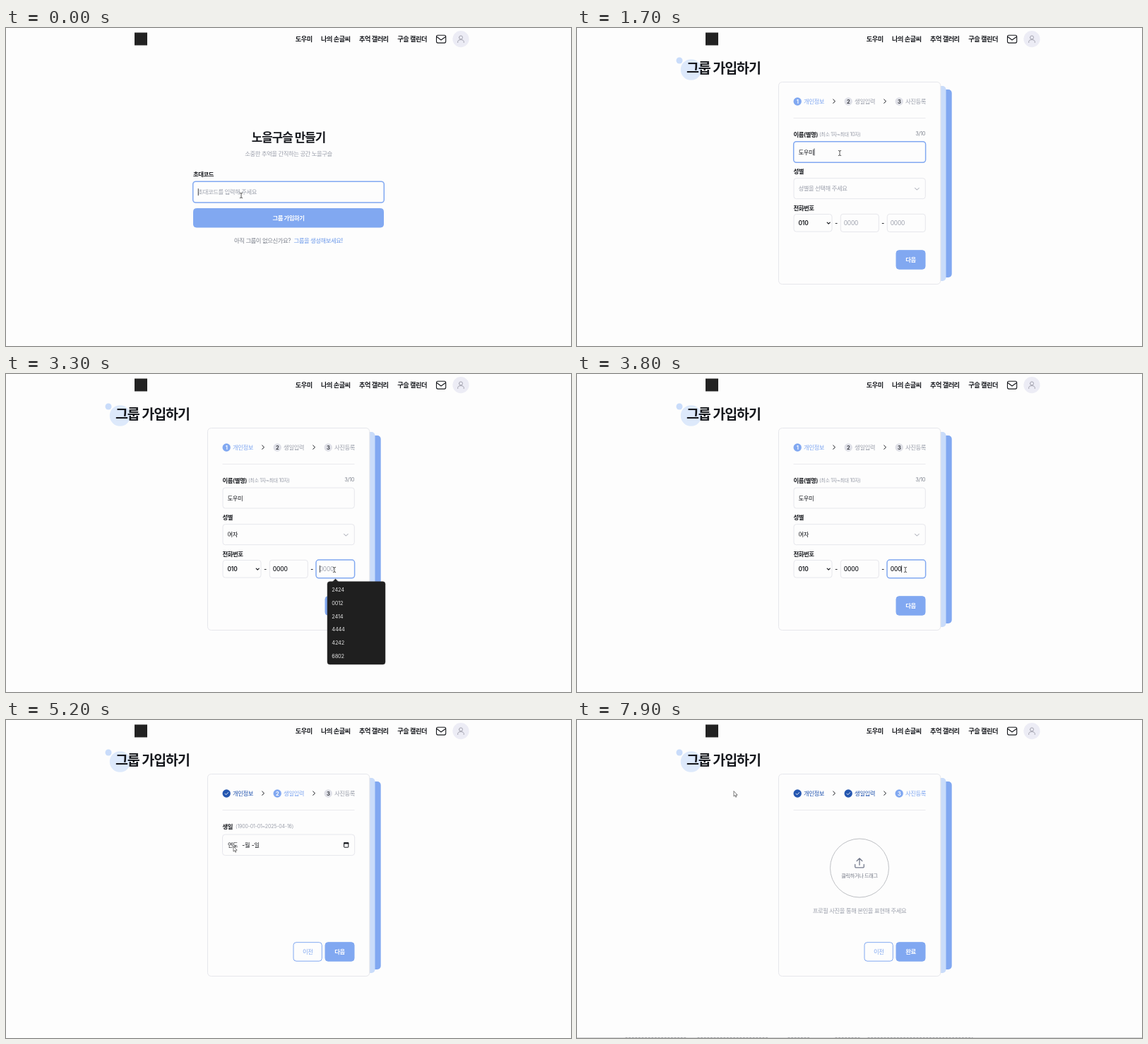
Animation, 800 px wide and 450 px high, one loop 8 s. Source, as an HTML page:

```html
<!DOCTYPE html>
<html lang="ko">
<head>
<meta charset="utf-8">
<title>그룹 가입하기</title>
<style>
  html, body { margin: 0; width: 100%; height: 100%; overflow: hidden; background: #fdfdfd; }
  svg { display: block; width: 800px; height: 450px; font-family: Inter, 'Noto Sans CJK KR', 'Noto Sans KR', sans-serif; }
</style>
</head>
<body>
<svg id="stage" viewBox="0 0 800 450"></svg>
<script>
const LOOP = 8000, TICK = 100;
const INK = '#16181d', GRAY = '#9ca0ac', LINE = '#e6e7ec', BLUE = '#81a8f1', PALE = '#c9dcfa', NAVY = '#2456b0', PAPER = '#fdfdfd';
const stage = document.getElementById('stage');
const hasHangul = s => /[\u3131-\uD7A3]/.test(s);

// y is the optical centre of the line
function text(x, y, s, { size = 8.4, fill = INK, weight = 500, anchor = 'start' } = {}) {
  const spacing = size * (hasHangul(s) ? -0.055 : -0.025);
  return `<text x="${x}" y="${y + size * 0.36}" font-size="${size}" font-weight="${weight}" fill="${fill}"
    text-anchor="${anchor}" letter-spacing="${spacing}" xml:space="preserve">${s}</text>`;
}
const rect = (x, y, w, h, fill, r = 0, stroke = 'none', sw = 1) =>
  `<rect x="${x}" y="${y}" width="${w}" height="${h}" rx="${r}" fill="${fill}" stroke="${stroke}" stroke-width="${sw}"/>`;
const circle = (x, y, r, fill, stroke = 'none') =>
  `<circle cx="${x}" cy="${y}" r="${r}" fill="${fill}" stroke="${stroke}" stroke-width=".8"/>`;
const path = (d, stroke = INK, sw = 1, fill = 'none') =>
  `<path d="${d}" fill="${fill}" stroke="${stroke}" stroke-width="${sw}" stroke-linecap="round" stroke-linejoin="round"/>`;

const textWidth = s => [...s].reduce((w, c) => w + (hasHangul(c) ? 7.25 : 5.05), 0);
const latest = (list, t) => list.reduce((v, [at, value]) => t >= at ? value : v, list[0][1]);

function field(x, y, w, h, { value = '', hint = '', focus = false, weight = 500, pad = 6.5 } = {}) {
  const box = focus ? rect(x - .3, y - .3, w + .6, h + .6, PAPER, 4, BLUE, 1.5) : rect(x, y, w, h, PAPER, 3.5, LINE);
  const cy = y + h / 2;
  const caret = focus ? rect(x + pad + textWidth(value) + .3, cy - 5, .8, 10, INK) : '';
  return box + text(x + pad, cy, value || hint, { fill: value ? INK : GRAY, weight: value ? weight : 400 }) + caret;
}
function button(x, y, w, h, label, outline) {
  return rect(x, y, w, h, outline ? PAPER : BLUE, 4, BLUE) +
    text(x + w / 2, y + h / 2, label, { fill: outline ? BLUE : '#fff', weight: outline ? 400 : 600, anchor: 'middle' });
}

function header() {
  const nav = [[409.8, '도우미'], [446, '나의 손글씨'], [500, '추억 갤러리'], [554.3, '구슬 캘린더']];
  return rect(182, 6.5, 18, 18, '#222') +
    nav.map(([x, s]) => text(x, 15.5, s, { size: 9.2, weight: 600 })).join('') +
    rect(609.5, 10.3, 13.2, 10.8, 'none', 2, INK, 1.1) +
    path('M610 12.5 L616 17 L622.3 12.5', INK, 1.1) +
    circle(644, 15.6, 11.6, '#ececf5') +
    path('M641.5 13.4a2.5 2.5 0 1 0 5 0a2.5 2.5 0 1 0 -5 0M639.7 20.5v-.7a4.3 3.2 0 0 1 8.6 0v.7', '#9a9aa6', .9);
}

function invitePage(t) {
  const code = t >= 200 ? 'A7K2Q9' : '';
  return text(400, 155, '노을구슬 만들기', { size: 16.8, weight: 700, anchor: 'middle' }) +
    text(400, 178, '소중한 추억을 간직하는 공간 노을구슬', { fill: GRAY, weight: 400, anchor: 'middle' }) +
    text(265, 207, '초대코드', { weight: 600 }) +
    field(265, 217.5, 270, 29.3, { value: code, hint: '초대코드를 입력해 주세요', focus: true }) +
    button(265.5, 255.5, 269, 26.5, '그룹 가입하기') +
    text(323, 301, '아직 그룹이 없으신가요?', { fill: '#7c818c', weight: 400 }) +
    text(407.5, 301, '그룹을 생성해보세요!', { fill: '#6f9bea' });
}

function cardFrame(step) {
  const steps = ['개인정보', '생일입력', '사진등록'].map((name, i) => {
    const x = 312.2 + 72 * i, n = i + 1, done = n < step, active = n === step;
    return circle(x, 104, 5.7, done ? NAVY : active ? BLUE : '#dfe0e7') +
      (done ? path(`M${x - 2.2} 104.2l1.6 1.6 3 -3.2`, '#fff', .9)
            : text(x, 104, String(n), { size: 7.4, weight: 700, fill: active ? '#fff' : '#3c3f47', anchor: 'middle' })) +
      text(x + 8.8, 104, name, { fill: done ? NAVY : active ? BLUE : GRAY }) +
      (i < 2 ? path(`M${x + 50.5} 101l2.8 2.7 -2.8 2.7`, INK, 1) : '');
  }).join('');
  return circle(145, 46, 4.5, PALE) + circle(161.5, 59, 14.7, '#dde9fb') +
    text(155, 56.5, '그룹 가입하기', { size: 19.5, weight: 700 }) +
    rect(500, 87, 30.7, 266, BLUE, 5) + rect(500, 82, 22.5, 276, PALE, 5) +
    rect(285.5, 76.5, 229.3, 286, PAPER, 5, LINE) + steps + rect(306.5, 127, 187, .8, LINE);
}

function suggestions(x, typed) {
  const list = ['2424', '0012', '2414', '4444', '4242', '6802'].filter(s => s.startsWith(typed));
  if (!list.length) return '';
  return path(`M${x + 7.5} 294l4 -4 4 4z`, '#1f1f1f', .5, '#1f1f1f') +
    rect(x, 293.7, 82, list.length * 18.7 + 5, '#1f1f1f', 3.5, '#3a3a3a', .5) +
    list.map((s, i) => text(x + 6.3, 305.5 + 18.7 * i, s, { size: 7.4, weight: 400, fill: '#e3e3e3' })).join('');
}

function personalPage(t) {
  const name = latest([[0, ''], [1100, 'ㄷ'], [1200, '도'], [1300, '도우'], [1400, '도우미']], t);
  const digits = start => '0'.repeat(Math.max(0, Math.min(4, (t - start) / TICK + 1)));
  const middle = digits(2900), last = digits(3600);
  const middleFocus = t >= 2800 && t < 3300, lastFocus = t >= 3300;
  const listOpen = t >= 2200 && t < 2500;
  let s = cardFrame(1) +
    text(306.5, 150.5, '이름(별명)', { weight: 600 }) +
    text(343, 150.8, '(최소 1자~최대 10자)', { size: 7.2, fill: GRAY, weight: 400 }) +
    text(493.3, 149.5, `${name.length}/10`, { size: 7.4, fill: '#7c818c', weight: 400, anchor: 'end' }) +
    field(307, 161, 186.3, 29, { value: name, hint: '이름을 입력해 주세요', focus: t >= 1000 && t < 2200 }) +
    text(306.5, 202.5, '성별', { weight: 600 }) +
    field(307, 212.7, 186.3, 29, { value: t >= 2500 ? '여자' : '', hint: '성별을 선택해 주세요' }) +
    path('M478.6 226.4l2.8 2.8 2.8 -2.8', GRAY, 1) +
    text(306.5, 254.5, '전화번호', { weight: 600 }) +
    field(307, 263.5, 54, 24.6, { value: '010', weight: 600 }) +
    path('M354.2 275.2l2 2 2 -2', INK, 1.2) +
    text(367, 275.7, '-', { anchor: 'middle', weight: 600 }) + text(433, 275.7, '-', { anchor: 'middle', weight: 600 }) +
    field(373.3, 263.3, 54, 25.2, { value: middle, hint: '0000', focus: middleFocus, pad: 4.5 }) +
    field(439.3, 263.3, 54, 25.2, { value: last, hint: '0000', focus: lastFocus, pad: 4.5 }) +
    button(452, 314.7, 41, 26.5, '다음');
  if (listOpen) {
    s += rect(307, 244.5, 186.3, 46, '#fff', 3.5, LINE) + rect(309.5, t >= 2300 ? 267.5 : 247, 181.3, 20.5, '#f1f3f8', 2.5) +
      text(313.5, 257.3, '남자') + text(313.5, 277.8, '여자');
  }
  if (middleFocus) s += suggestions(389, middle);
  if (lastFocus) s += suggestions(455, last);
  return s;
}

function birthdayPage(t) {
  const parts = [
    { x: 314, w: 20, value: latest([[0, '연도'], [5500, '0002'], [5600, '0020'], [5700, '0200'], [5800, '2000']], t) },
    { x: 338, w: 10, value: latest([[0, '월'], [5900, '00'], [6000, '01']], t) },
    { x: 351.4, w: 10, value: latest([[0, '일'], [6100, '00'], [6300, '01']], t) }
  ];
  const selected = latest([[0, -1], [5400, 0], [5800, 1], [6000, 2]], t);
  const date = parts.map(({ x, w, value }, i) =>
    (i === selected ? rect(x - .5, 171, w + 1.2, 11.5, '#3b7fd0') : '') +
    text(x, 177, value, { size: 8.2, fill: i === selected ? '#fff' : INK })).join('');
  const focus = t >= 5400;
  return cardFrame(2) +
    text(306.5, 150.5, '생일', { weight: 600 }) +
    text(325, 150.8, '(1900-01-01~2025-04-16)', { size: 7, fill: GRAY, weight: 400 }) +
    rect(306.5, 162, 187.2, 29.6, PAPER, 4, focus ? BLUE : LINE, focus ? 1.5 : 1) + date +
    text(334.3, 176.5, '-') + text(347.7, 176.5, '-') +
    rect(478.6, 173.8, 6.2, 6.4, 'none', .5, INK, 1) + rect(478.2, 173.2, 7, 2.2, INK) +
    button(407, 314.7, 40.3, 26.5, '이전', true) + button(452, 314.7, 41, 26.5, '다음');
}

function photoPage(t) {
  let s = cardFrame(3) + circle(400, 209.5, 41.5, PAPER, '#aeb0b5') +
    path('M400 205.3v-9.4M396.2 199.5l3.8 -3.8 3.8 3.8M393.7 204.3v3.2a1.4 1.4 0 0 0 1.4 1.4h9.8a1.4 1.4 0 0 0 1.4 -1.4v-3.2', '#747b8d', 1.3) +
    text(400, 220, '클릭하거나 드래그', { size: 7.2, fill: '#747986', anchor: 'middle' }) +
    text(400, 270, '프로필 사진을 통해 본인을 표현해 주세요', { fill: GRAY, weight: 400, anchor: 'middle' }) +
    button(407, 314.7, 40.3, 26.5, '이전', true) + button(452, 314.7, 41, 26.5, '완료');
  if (t >= 7900) {
    s += rect(0, 449, 800, 1, '#d4d4d6') +
      path('M69 449.7H155M171 449.7H270M299 449.7H330M366 449.7H400M412 449.7H560', '#77797d', .7)
        .replace('/>', ' stroke-dasharray="2 2.6"/>');
  }
  return s;
}

const route = [
  [0, 333, 237], [100, 333, 237], [400, 352, 266], [600, 352, 262], [700, 352, 262], [1000, 372, 177],
  [1800, 372, 177], [2100, 380, 229], [2200, 380, 229], [2400, 376, 277], [2500, 376, 277], [2700, 392, 273],
  [3000, 392, 273], [3300, 465, 277], [3900, 465, 277], [4400, 466, 339], [4600, 466, 339], [5200, 322, 179],
  [6500, 322, 179], [7000, 466, 335], [7200, 466, 335], [7900, 222, 101]
];
const shapes = [[0, 'beam'], [300, 'hand'], [500, 'arrow'], [900, 'beam'], [2000, 'hand'], [2200, 'arrow'],
  [2600, 'beam'], [4100, 'hand'], [4800, 'arrow'], [6900, 'hand'], [7300, 'arrow']];

function pointer(t) {
  const next = route.findIndex(([at]) => at > t);
  const b = next < 0 ? route[route.length - 1] : route[next];
  const a = next < 0 ? b : route[next - 1];
  const u = a === b ? 0 : (t - a[0]) / (b[0] - a[0]);
  const ease = u * u * (3 - 2 * u);
  const x = a[1] + (b[1] - a[1]) * ease, y = a[2] + (b[2] - a[2]) * ease;
  const drawing = {
    beam: path('M-1.7 -3.6Q0 -3.6 0 -2.6Q0 -3.6 1.7 -3.6M0 -2.6V2.6M-1.7 3.6Q0 3.6 0 2.6Q0 3.6 1.7 3.6', '#333', .8),
    arrow: path('M0 0V7.1L1.6 5.6L2.8 8.2L3.9 7.7L2.8 5.2H4.8Z', '#444', .7, '#fff'),
    hand: path('M-1.5 1V-3.6a.8 .8 0 0 1 1.6 0V-.8l2.7 .6q1.1 .3 1 1.4l-.5 2.8H-.8L-3.6 .8q.6 -1 2.1 .2z', '#333', .8, '#fff')
  }[latest(shapes, t)];
  return `<g transform="translate(${x} ${y})">${drawing}</g>`;
}

const pages = [[0, invitePage], [500, personalPage], [4600, birthdayPage], [7200, photoPage]];

let shown = -1;
function render(time) {
  const t = Math.floor((time % LOOP) / TICK) * TICK;
  if (t !== shown) {
    shown = t;
    stage.innerHTML = header() + latest(pages, t)(t) + pointer(t);
  }
}

const start = performance.now();
function loop() {
  render(performance.now() - start);
  requestAnimationFrame(loop);
}
loop();
</script>
</body>
</html>
```
